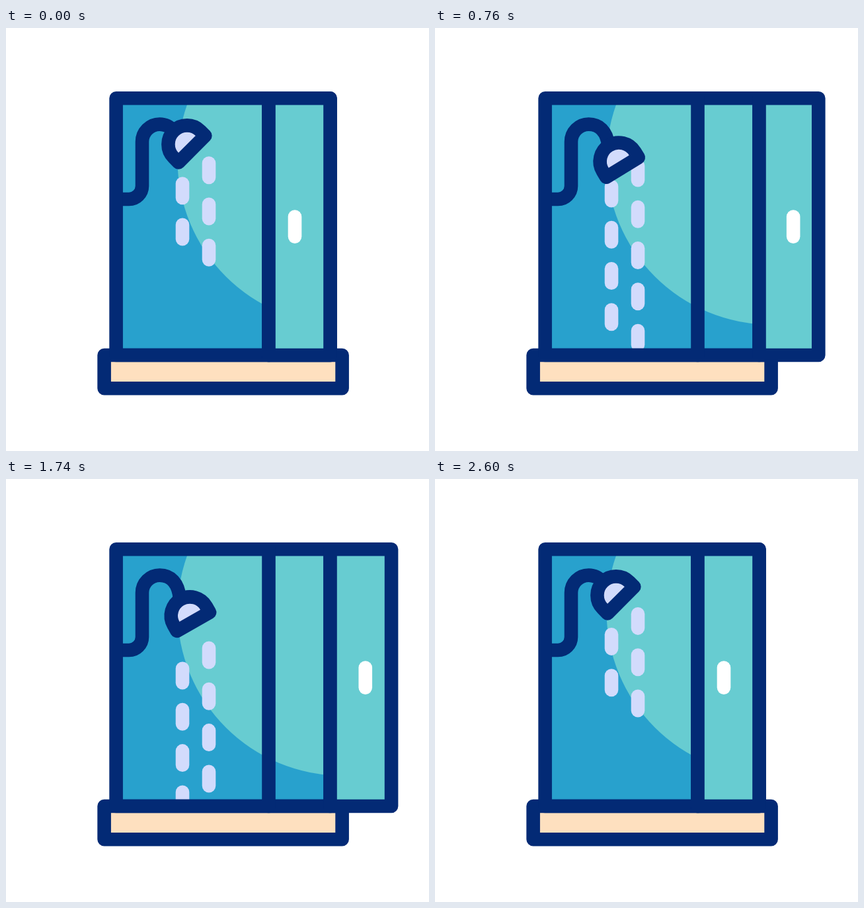
Recreate the animation shown at these times as an HTML page with a canvas. Size 640 by 640 pixels, loop 2620 ms.

```html
<!DOCTYPE html>
<html lang="en">
<head>
<meta charset="utf-8">
<title>Shower cabin</title>
<style>
html, body { margin: 0; width: 100%; height: 100%; overflow: hidden; background: #fff; }
canvas { display: block; width: 640px; height: 640px; }
</style>
</head>
<body>
<canvas id="stage" width="640" height="640"></canvas>
<script>
const ctx = document.getElementById('stage').getContext('2d');
const LOOP = 2620, LINE = 20.6, GAP = 62.3;
const NAVY = '#032a75', BLUE = '#28a1cd', TEAL = '#67ccd1', DROP = '#d2dbfc', SAND = '#fee0bf';

// door: -1 closed, 1 fully open; x, y, angle: rim of the head; c1x, c2x, c2y, ex, ey: end of the pipe
const CLOSED = { door: -1, x: 281.2, y: 183.2, angle: 45, c1x: 241.2, c2x: 248.2, c2y: 149.5, ex: 253.4, ey: 155.9 };
const OPEN = { door: 1, x: 283.3, y: 216.6, angle: 29.3, c1x: 249, c2x: 261, c2y: 157, ex: 263, ey: 181 };
const MIDDLE = { door: .785, x: 284.5, y: 180.9, angle: 43.3, c1x: 243, c2x: 251, c2y: 148.5, ex: 257.9, ey: 152.7 };
const POSES = [[0, CLOSED], [604, OPEN], [1200, MIDDLE], [1796, OPEN], [2400, CLOSED], [LOOP, CLOSED]];

// time and distance the water has fallen
const FALL = [[0, 0], [480, 58], [1020, 211], [1340, 325], [1740, 487], [1980, 588], [LOOP, 790]];
const TOTAL = FALL[FALL.length - 1][1];

function segment(keys, t) {
  let i = 0;
  while (i < keys.length - 2 && t >= keys[i + 1][0]) i++;
  return i;
}

function poseAt(t) {
  const i = segment(POSES, t);
  const [t0, a] = POSES[i], [t1, b] = POSES[i + 1];
  const k = (1 - Math.cos(Math.PI * (t - t0) / (t1 - t0))) / 2;
  const pose = {};
  for (const key in a) pose[key] = a[key] + (b[key] - a[key]) * k;
  return pose;
}

function slope(i) {
  if (i === 0) return .04;
  if (i === FALL.length - 1) return 0;
  const [[t0, y0], [t1, y1], [t2, y2]] = FALL.slice(i - 1, i + 2);
  return ((y1 - y0) / (t1 - t0) * (t2 - t1) + (y2 - y1) / (t2 - t1) * (t1 - t0)) / (t2 - t0);
}

function fallAt(t) {
  const i = segment(FALL, t);
  const [t0, y0] = FALL[i], [t1, y1] = FALL[i + 1];
  const d = t1 - t0, u = (t - t0) / d, v = 1 - u;
  return y0 * v * v * (1 + 2 * u) + y1 * u * u * (1 + 2 * v)
    + d * u * v * (slope(i) * v - slope(i + 1) * u);
}

function stroke(color = NAVY) {
  ctx.strokeStyle = color;
  ctx.stroke();
}

function line(x0, y0, x1, y1, color) {
  ctx.beginPath();
  ctx.moveTo(x0, y0);
  ctx.lineTo(x1, y1);
  stroke(color);
}

function box(x, y, w, h, fill) {
  ctx.beginPath();
  ctx.rect(x, y, w, h);
  if (fill) {
    ctx.fillStyle = fill;
    ctx.fill();
  }
  stroke();
}

function toHead(p) {
  ctx.translate(p.x, p.y);
  ctx.rotate(-p.angle * Math.PI / 180);
}

function column(x, top, count, shift) {
  for (let i = 0; i < count; i++) {
    const y = top - i * GAP + shift;
    if (y > 60 && y < 490) line(x, y + LINE / 2, x, y + 42 - LINE / 2, DROP);
  }
}

function water(t, p) {
  const shift = fallAt(t), extra = t < 100 ? 0 : 7;
  ctx.save();
  ctx.beginPath();
  ctx.rect(166, 106, 320, 389);
  ctx.clip();
  // water shows only below the rim of the head
  ctx.save();
  toHead(p);
  ctx.beginPath();
  ctx.rect(-600, 0, 1200, 800);
  ctx.restore();
  ctx.clip();
  column(307, 318.8, 3 + extra, shift);
  column(267, 287.5, 2 + extra, shift);
  column(307, 318.8, 3, shift - TOTAL);
  column(267, 287.5, 2, shift - TOTAL);
  ctx.restore();
}

function pipe(p) {
  ctx.beginPath();
  ctx.moveTo(168, 259);
  ctx.lineTo(186, 259);
  ctx.arcTo(206, 259, 206, 239, 20);
  ctx.lineTo(206, 172);
  ctx.arcTo(206, 145.6, 232.5, 145.6, 26.5);
  ctx.bezierCurveTo(p.c1x, 145.6, p.c2x, p.c2y, p.ex, p.ey);
  stroke();
}

function head(p) {
  ctx.save();
  toHead(p);
  ctx.beginPath();
  ctx.moveTo(-28.5, 0);
  ctx.arc(0, -10.3, 28.5, Math.PI, 0);
  ctx.lineTo(28.5, 0);
  ctx.closePath();
  ctx.fillStyle = DROP;
  ctx.fill();
  stroke();
  ctx.restore();
}

function glass() {
  ctx.save();
  ctx.beginPath();
  ctx.rect(166.6, 106.3, 324, 388.7);
  ctx.clip();
  ctx.fillStyle = BLUE;
  ctx.fillRect(160, 100, 340, 400);
  ctx.beginPath();
  ctx.arc(508.4, 199.8, 248.9, 0, 2 * Math.PI);
  ctx.fillStyle = TEAL;
  ctx.fill();
  ctx.restore();
}

function draw(t) {
  const p = poseAt(t);
  ctx.fillStyle = '#fff';
  ctx.fillRect(0, 0, 640, 640);
  ctx.lineWidth = LINE;
  ctx.lineCap = ctx.lineJoin = 'round';

  glass();
  water(t, p);
  pipe(p);
  head(p);
  box(148.6, 495, 360, 50.2, SAND);
  box(166.6, 106.3, 324, 388.7);
  line(397.5, 106.3, 397.5, 495);

  const edge = 490.5 + 93 * p.door, grip = 490.5 + 53.5 * p.door;
  box(Math.min(edge, 490.5), 106.3, Math.abs(edge - 490.5), 388.7, TEAL);
  line(grip, 285.6, grip, 315.6, '#fff');
}

function tick() {
  draw(performance.now() % LOOP);
  requestAnimationFrame(tick);
}
tick();
</script>
</body>
</html>
```
